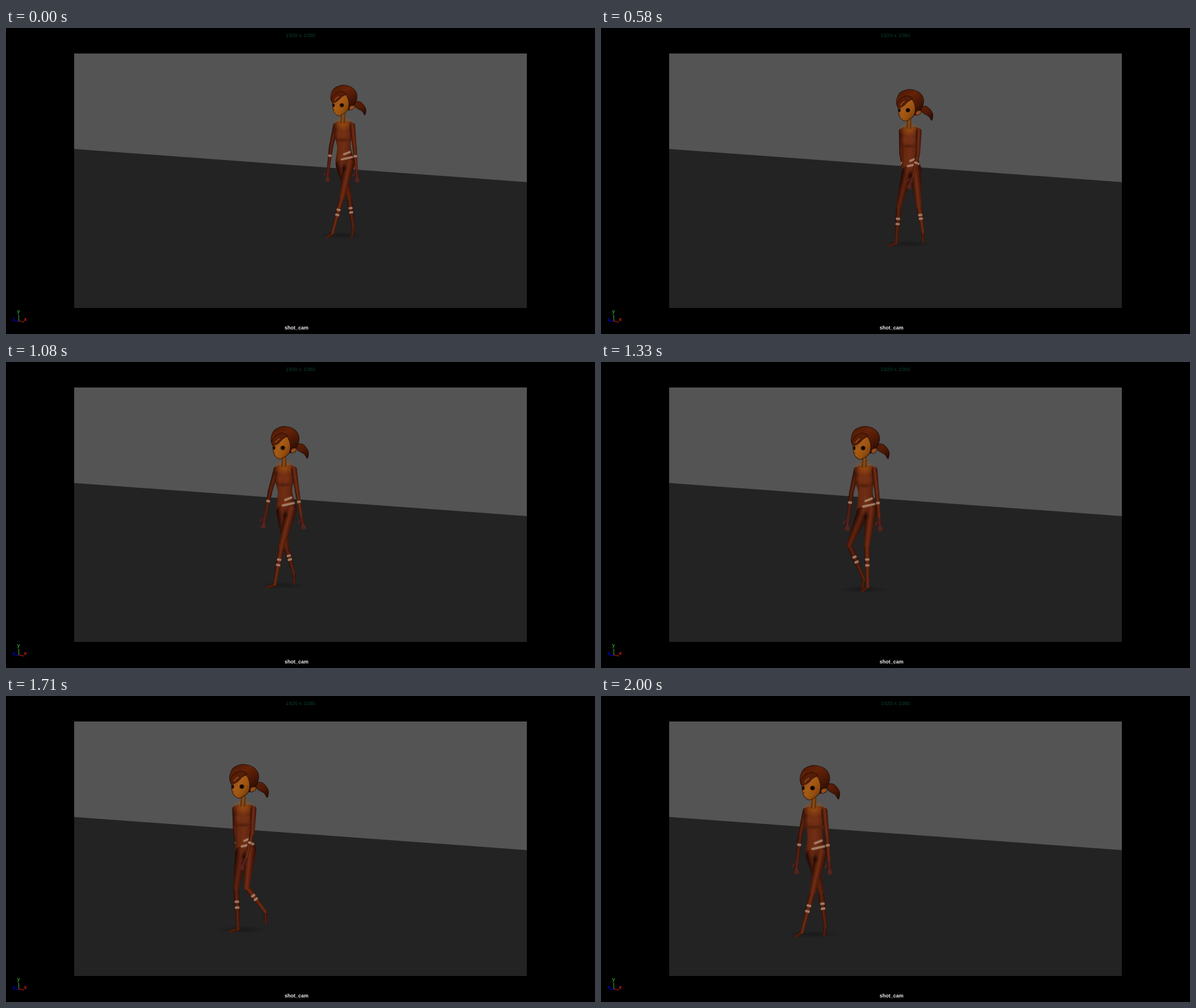
Recreate the animation shown at these times as an HTML page with a canvas. Size 1037 px wide and 540 px high, loop 2.04 s.

```html
<!DOCTYPE html>
<html lang="en">
<head>
<meta charset="utf-8">
<title>Walk cycle</title>
<style>
  html, body { margin: 0; width: 100%; height: 100%; overflow: hidden; background: #000; }
  svg, canvas { position: absolute; left: 0; top: 0; width: 1037px; height: 540px; display: block; }
  text { font-family: "Liberation Sans", Arial, sans-serif; }
</style>
</head>
<body>
<svg viewBox="0 0 1037 540">
  <rect width="1037" height="540"/>
  <rect x="120" y="45" width="797" height="449" fill="#545454"/>
  <path d="M120 213.5L917 272V494H120Z" fill="#232323"/>
  <text x="518.5" y="16" font-size="9.5" text-anchor="middle" fill="#0c3d28">1920 x 1080</text>
  <text x="511.5" y="532" font-size="9" font-weight="700" text-anchor="middle" fill="#eee">shot_cam</text>
  <g fill="none" stroke-width="1.2">
    <path d="M22.5 506V517" stroke="#3a9a3a"/>
    <path d="M22 517.5H16" stroke="#0000d8"/>
    <path d="M22 517L32 519" stroke="#c81e14"/>
  </g>
  <g font-size="9" font-weight="700" text-anchor="middle">
    <text x="22" y="503" fill="#2f9a2f">y</text>
    <text x="14" y="517" fill="#0000e0">z</text>
    <text x="34" y="517" fill="#d42015">x</text>
  </g>
</svg>
<canvas id="stage" width="1037" height="540"></canvas>
<script>
const ctx = document.getElementById('stage').getContext('2d');
const LOOP = 2040, FPS = 24, LAST = 48;
const VANISH = { x: 2340, y: -72 };   // the walk runs straight away from this point
const APPROACH = 0.0556;
const TREAD = 102;                    // speed of a planted foot relative to the body

const SKIN = ['#2c0d05', '#722d14', '#3a1207'];
const SKIN_FAR = ['#270b05', '#5f2410', '#300e06'];
const HAND = ['#30100d', '#5c231c', '#351210'];
const FOOT = ['#2a0c06', '#58200e', '#2a0c06'];
const EDGE = 'rgba(20,6,2,.7)';

// Walk rules; phase runs from 0 to 1, one cycle per second
const wave = (p, peak, times = 1) => Math.cos(2 * Math.PI * times * (p - peak));
const bump = (p, at, width) => {
  const d = p - at - Math.round(p - at);
  return Math.exp(-((d / width) ** 2));
};
const ease = u => u * u * (3 - 2 * u);

function bodyPose(p) {
  const x = 603 + 1.5 * wave(p, 0.25) - 9.5 * bump(p, 0.97, 0.08);
  const y = 101.2 + 1.8 * wave(p, 0.14, 2);
  return { hx: x, hy: y, sy: y + 68, px: x + 1.5, py: y + 130 };
}
// c is 0 when the heel lands; the foot is carried back, then swings forward
function legPose(c, near) {
  const lift = 0.7, reach = TREAD * lift;
  const back = c < lift ? TREAD * c : reach * (1 - ease((c - lift) / (1 - lift)));
  const toe = [(near ? 565 : 558) + back, 369.5 - 14 * bump(c, 0.7, 0.13)];
  const roll = wave(c, 0.16), bend = 4 * wave(c, 0.1, 2);
  return {
    toe,
    ankle: [toe[0] + 6 + 7 * roll, toe[1] - 11 + 7 * roll],
    knee: [(near ? 603 : 590) + 13 * wave(c, 0.48) + bend, 297.5 + bend]
  };
}
// Angles in degrees from hanging straight down
function armPose(p, near) {
  const u = wave(p, 0.17);
  return near ? { upper: 3 + 6 * u, fore: -1 + 12 * u, hand: -6 + 19 * u }
              : { upper: -8.5 - 9 * u, fore: -2 - 11 * u, hand: 3 - 17 * u };
}

const mix = (a, b, u) => [a[0] + (b[0] - a[0]) * u, a[1] + (b[1] - a[1]) * u];
const swing = (p, deg, len) => {
  const a = deg * Math.PI / 180;
  return [p[0] + Math.sin(a) * len, p[1] + Math.cos(a) * len];
};

// Closed smooth outline through a few points
function blob(pts, fill, edge = EDGE) {
  const n = pts.length, at = i => pts[(i + n) % n];
  ctx.beginPath();
  ctx.moveTo(...pts[0]);
  for (let i = 0; i < n; i++) {
    const [a, b, c, d] = [at(i - 1), at(i), at(i + 1), at(i + 2)];
    ctx.bezierCurveTo(b[0] + (c[0] - a[0]) / 6, b[1] + (c[1] - a[1]) / 6,
      c[0] - (d[0] - b[0]) / 6, c[1] - (d[1] - b[1]) / 6, c[0], c[1]);
  }
  ctx.fillStyle = fill;
  ctx.fill();
  if (edge) { ctx.strokeStyle = edge; ctx.lineWidth = 1; ctx.stroke(); }
}
function ramp(x0, y0, x1, y1, colors) {
  const g = ctx.createLinearGradient(x0, y0, x1, y1);
  colors.forEach((c, i) => g.addColorStop(i / (colors.length - 1), c));
  return g;
}
function glow(x, y, rx, ry, rgb, alpha) {
  ctx.save();
  ctx.translate(x, y);
  ctx.scale(rx, ry);
  const g = ctx.createRadialGradient(0, 0, 0, 0, 0, 1);
  g.addColorStop(0, `rgba(${rgb},${alpha})`);
  g.addColorStop(1, `rgba(${rgb},0)`);
  ellipse(0, 0, 1, 1, g);
  ctx.restore();
}
function ellipse(x, y, rx, ry, fill) {
  ctx.beginPath();
  ctx.ellipse(x, y, rx, ry, 0, 0, 7);
  ctx.fillStyle = fill;
  ctx.fill();
}
function line(width, color, ...pts) {
  ctx.beginPath();
  pts.forEach(p => ctx.lineTo(...p));
  ctx.lineWidth = width;
  ctx.strokeStyle = color;
  ctx.stroke();
}
// Tapered capsule, shaded across its width
function limb(a, ra, b, rb, colors) {
  const angle = Math.atan2(b[1] - a[1], b[0] - a[0]);
  const nx = -Math.sin(angle), ny = Math.cos(angle), r = (ra + rb) / 2 + 0.5, m = mix(a, b, 0.5);
  ctx.beginPath();
  ctx.arc(a[0], a[1], ra, angle + Math.PI / 2, angle - Math.PI / 2);
  ctx.arc(b[0], b[1], rb, angle - Math.PI / 2, angle + Math.PI / 2);
  ctx.closePath();
  ctx.fillStyle = ramp(m[0] + nx * r, m[1] + ny * r, m[0] - nx * r, m[1] - ny * r, colors);
  ctx.fill();
}
// Soft painted stripe: wide and faint below, narrow and bright on top
function stripe(a, b) {
  line(5, 'rgba(160,115,90,.4)', a, b);
  line(3, 'rgba(172,140,118,.8)', a, b);
}
function band(a, b, u, r) {
  const c = mix(a, b, u), len = Math.hypot(b[0] - a[0], b[1] - a[1]);
  const nx = -(b[1] - a[1]) / len * r, ny = (b[0] - a[0]) / len * r;
  stripe([c[0] - nx, c[1] - ny], [c[0] + nx, c[1] + ny]);
}

function drawLeg(p, near, hip, colors) {
  const { toe, ankle, knee } = legPose(p % 1, near);
  const calf = mix(knee, ankle, 0.3);
  limb(ankle, 3, toe, 1.9, FOOT);
  limb(calf, 4.5, ankle, 2.4, colors);
  limb(knee, 4.5, calf, 4.5, colors);
  limb(hip, 9.8, knee, 4.7, colors);
  for (const u of [0.35, 0.49]) band(knee, ankle, u, 3.5);
}
function drawArm(p, near, shoulder, colors) {
  const a = armPose(p, near);
  const elbow = swing(shoulder, a.upper, 37), wrist = swing(elbow, a.fore, 40);
  const palm = swing(wrist, a.hand, 12);
  ctx.lineCap = 'round';
  for (const spread of [-12, 4, 18]) line(2.2, HAND[1], palm, swing(palm, a.hand + spread, 11));
  line(2, HAND[1], swing(wrist, a.hand, 4), swing(wrist, a.hand - 28, 14));
  ctx.lineCap = 'butt';
  limb(wrist, 2.4, palm, 3.6, HAND);
  limb(elbow, 3.8, wrist, 2.5, colors);
  limb(shoulder, 4.8, elbow, 3.7, colors);
  band(elbow, wrist, 0.44, 3);
}

function drawTorso({ hx, sy, px, py }) {
  const mx = (hx + px) / 2 - 0.5, my = sy + 41;
  blob([[hx - 5, sy - 4], [hx - 14, sy - 1], [hx - 17, sy + 18], [mx - 12, my],
    [px - 16, py + 9], [px - 8, py + 18], [px + 8, py + 18], [px + 18, py + 9],
    [mx + 12, my], [hx + 15, sy + 18], [hx + 15, sy - 1], [hx + 4, sy - 4]],
    ramp(hx - 18, sy, hx + 18, sy, ['#321006', '#682911', '#702e14', '#602510', '#300e06']), null);
  glow(hx - 1, sy, 19, 14, '165,84,16', 0.75);
  glow(hx - 9, sy + 18, 9, 9, '150,70,32', 0.3);
  glow(hx + 5, sy + 18, 9, 9, '150,70,32', 0.25);
  glow(hx - 2, sy + 29, 14, 4, '30,8,2', 0.4);
}
function drawHips({ px, py }) {
  glow(px - 1, py + 5, 13, 13, '112,45,20', 0.8);
  glow(px - 1, py + 17, 6, 7, '24,6,2', 0.6);
  ctx.lineCap = 'round';
  stripe([px - 1, py - 8], [px + 9, py - 12]);
  stripe([px - 5, py + 1], [px + 13, py - 3]);
  ctx.lineCap = 'butt';
}

function drawHead({ hx, hy }) {
  ctx.save();
  ctx.translate(hx, hy);
  limb([-1, 50], 3.4, [-2, 65], 4, ['#4a2208', '#925014', '#4a2208']);
  blob([[20, 30], [28, 29], [35, 35], [39, 43], [37, 53], [32, 46], [21, 39]],
    ramp(20, 28, 38, 50, ['#5c2007', '#511a06', '#2e0d03']));
  blob([[-23, 24], [-19, 8], [-9, 1.5], [1, 0], [14, 4], [22, 13], [23, 24], [18, 36], [11, 43],
    [0, 44], [-14, 38]],
    ramp(-14, 0, 16, 42, ['#4e1a06', '#642308', '#4a1806', '#2a0c03']));
  blob([[-19, 27], [-20, 36], [-18, 46], [-13, 52], [-8, 54], [-1, 51], [7, 44],
    [9, 32], [6, 21], [2, 17], [-6, 21]],
    ramp(-20, 26, 10, 46, ['#7c3c12', '#a75c17', '#98510f', '#6c340a']));
  blob([[4, 15], [-4, 21], [-10, 27], [-19, 31], [-22, 26], [-17, 17], [-6, 11]], '#571d07');
  line(1.5, '#945519', [-9, 20], [-13, 23], [-16, 27]);
  blob([[10, 39], [14, 36], [19, 37], [17, 42], [11, 44]], '#944c1c');
  ellipse(-3.5, 35.5, 4, 3.8, '#52280c');
  ellipse(-3.5, 35.5, 2.9, 3, '#0c0705');
  ellipse(-18, 35.5, 1.8, 3.2, '#160a05');
  line(0.9, 'rgba(60,22,6,.6)', [-16, 42], [-18, 43.5], [-16, 44.5]);
  ctx.restore();
}

function draw(step) {
  const t = step / FPS, p = t % 1, s = 1 / (1 - APPROACH * t), b = bodyPose(p);
  ctx.setTransform(1, 0, 0, 1, 0, 0);
  ctx.clearRect(0, 0, 1037, 540);
  ctx.setTransform(s, 0, 0, s, VANISH.x * (1 - s), VANISH.y * (1 - s));

  glow(b.px - 4, 366, 40, 6, '0,0,0', 0.25);
  drawArm(p, false, [b.hx - 14, b.sy + 3], SKIN_FAR);
  drawTorso(b);
  drawLeg(p + 0.5, false, [b.px - 6, b.py + 11], SKIN_FAR);
  drawLeg(p, true, [b.px + 7.5, b.py + 11], SKIN);
  drawHips(b);
  drawArm(p, true, [b.hx + 15, b.sy + 3], SKIN);
  drawHead(b);
}

// Steps begin on whole hundredths of a second
const startOf = step => Math.round(step * 100 / FPS) * 10;
const origin = performance.now();
let shown = -1;
function tick() {
  const ms = (performance.now() - origin) % LOOP;
  let step = LAST;
  while (step > 0 && startOf(step) > ms) step--;
  if (step !== shown) draw(shown = step);
  requestAnimationFrame(tick);
}
tick();
</script>
</body>
</html>
```
